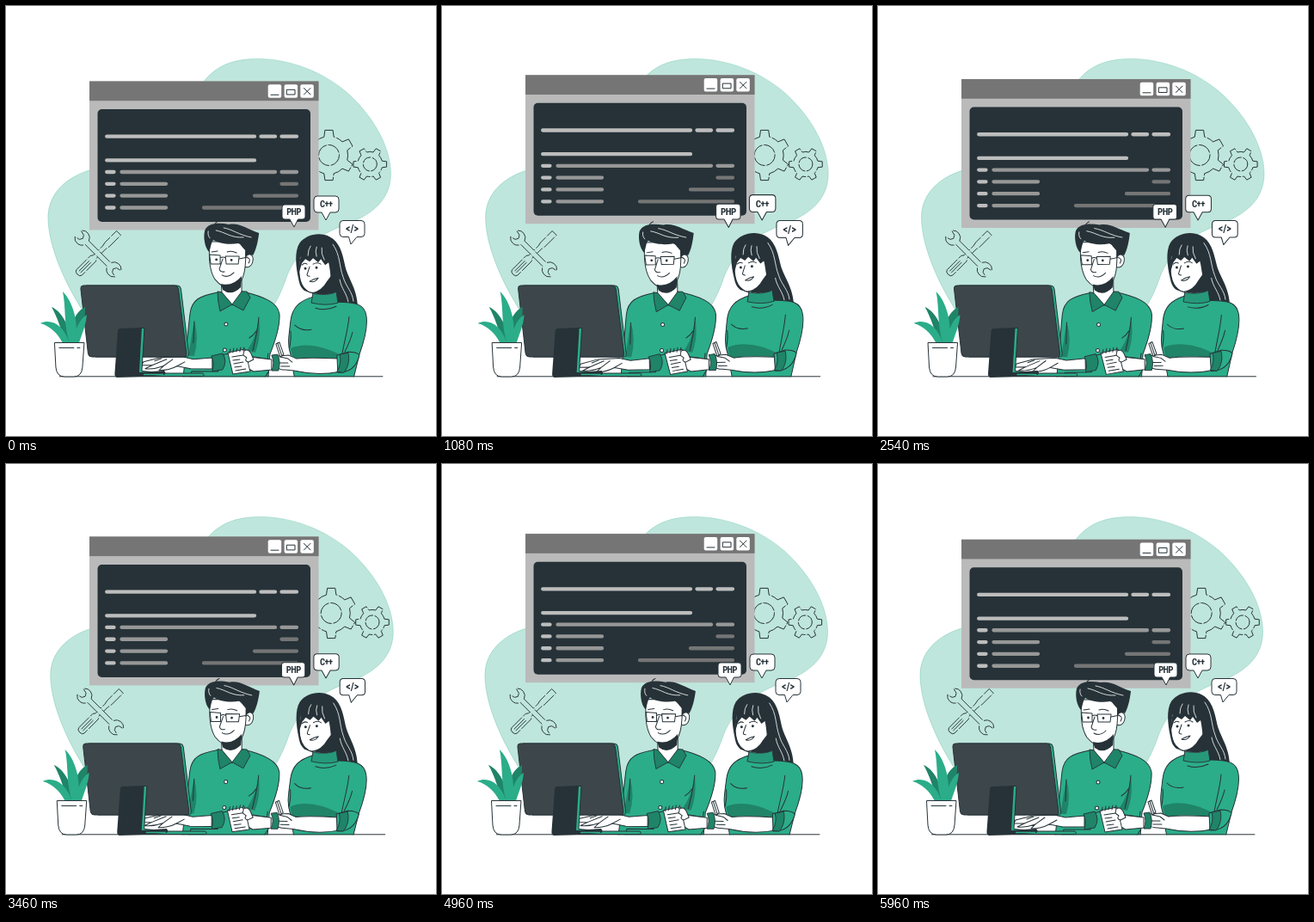
Recreate the animation shown at these times as an HTML page. Size 500x500 px, loop 6 s.

```html
<!DOCTYPE html>
<html lang="en">
<head>
<meta charset="utf-8">
<title>Coding together</title>
<style>
html, body { margin: 0; width: 100%; height: 100%; overflow: hidden; background: #fff; }
svg { display: block; width: 100vw; height: 100vh; }
.ink { fill: none; stroke: #263238; stroke-width: 1; stroke-linecap: round; stroke-linejoin: round; }
.skin { fill: #fff; stroke: #263238; stroke-width: 1; stroke-linejoin: round; }
.cloth { fill: #2bad89; stroke: #263238; stroke-width: 1; stroke-linejoin: round; }
.shade { fill: #1f8468; stroke: #263238; stroke-width: .9; stroke-linejoin: round; }
.dark { fill: #263238; }
.tint { fill: #bfe6dc; stroke: #263238; stroke-width: .9; stroke-linejoin: round; stroke-dasharray: 17 2; }
.light { stroke: #fff; stroke-width: .8; fill: none; stroke-linecap: round; }
.code { fill: none; stroke-width: 4.3; stroke-linecap: round; }
text { font-family: "Roboto Condensed", Roboto, "Liberation Sans", sans-serif; font-stretch: condensed; font-weight: 700; fill: #263238; text-anchor: middle; }
</style>
</head>
<body>
<svg viewBox="0 0 500 500">
  <clipPath id="above"><rect width="500" height="431.300"/></clipPath>

  <g id="blob">
    <path fill="#bfe6dc" stroke="#2bad89" stroke-opacity=".45" stroke-width=".6" d="M91 357C70 325 50 282 49 248C48 220 68 200 97 191C150 172 190 155 215 110C230 85 243 67 276 62.500C316 57 364 72 397 101C429 130 447 165 447.500 194C448 225 426 243 393 255C355 269 334 292 325 319C313 352 290 395 230 398H130C112 390 100 372 91 357Z"/>
  </g>

  <g id="icons">
    <path id="gearA" class="ink"/>
    <circle class="ink" cx="375.500" cy="173.500" r="12" stroke-dasharray="16 2.500"/>
    <path id="gearB" class="ink"/>
    <circle class="ink" cx="423.300" cy="184" r="8" stroke-dasharray="11 2.500"/>
    <g transform="translate(107 288)">
      <path class="tint" transform="rotate(-45)" d="M-31-4.500H-8L-5-2.500H10L15-3.500H34V3.500H15L10 2.500H-5L-8 4.500H-31Q-34 4-34 0T-31-4.500ZM-30-1.300H-12M-30 1.300H-12"/>
      <path class="tint" transform="rotate(45)" d="M-18-3A8.500 8.500 0 0 0-33-5L-27-3.500L-25 0L-27 3.500L-33 5A8.500 8.500 0 0 0-18 3H18A8.500 8.500 0 0 0 33 5L27 3.500L25 0L27-3.500L33-5A8.500 8.500 0 0 0 18-3Z"/>
    </g>
  </g>

  <g id="win">
    <rect x="97" y="87.500" width="266.500" height="173" fill="#bababa"/>
    <rect x="97" y="87.500" width="266.500" height="22.700" fill="#757575"/>
    <rect x="106.500" y="120" width="247.500" height="131" rx="5" class="dark"/>
    <g fill="#fff">
      <rect x="304.700" y="91.300" width="15.500" height="15.500" rx="2"/>
      <rect x="323.600" y="91.300" width="15.500" height="15.500" rx="2"/>
      <rect x="342.300" y="91.300" width="15.500" height="15.500" rx="2"/>
    </g>
    <path class="ink" d="M308 103.300H317M326.700 97.300H336V103H326.700ZM346.500 95.500L354 103M354 95.500L346.500 103"/>
    <path class="code" stroke="#bdbdbd" d="M117.200 151.700H289M296.500 151.700H313M320.500 151.700H338M117.200 179.400H289M117.200 193H125.500M117.200 206.800H125.500M117.200 220.600H125.500M117.200 234.500H125.500"/>
    <path class="code" stroke="#979797" d="M134.500 193H313M320.500 193H338M134.500 206.800H186M134.500 220.600H186M134.500 234.500H186"/>
    <path class="code" stroke="#757575" d="M320.500 206.800H338M289 220.600H338M230 234.500H338"/>
  </g>

  <g clip-path="url(#above)">
  <g id="people">
    <!-- woman -->
    <path class="dark" d="M340 317C337 303 335 286 341 276C348 266 364 262 376 268C388 274 391 287 394 301C397 316 408 327 409 349C397 351 380 348 372 340L347 331C342 327 341 322 340 317Z"/>
    <path class="light" d="M380 277C389 290 387 302 392 315C395 326 403 332 404 343M388 318C390 329 396 333 398 344"/>
    <path class="cloth" d="M357 338C341 343 333 350 331 366C329 384 327 393 331 405L336 434H404L411 405C416 391 421 372 419 360C417 347 408 344 385 344Z"/>
    <path fill="#1f8468" d="M331 398C345 391 368 394 390 406L386 412H334Z"/>
    <path class="ink" d="M331 378C332 385 331 391 330 397M399 361C398 374 394 388 391 404M403 379C401 388 397 396 394 402M336 371C342 377 350 377 355 376M360 351Q372 355 384 349"/>
    <path class="skin" d="M342 291C339 309 341 324 349 330Q353 334 357 333V339Q367 343 378 337V291Z"/>
    <path class="dark" d="M356 333Q367 331 373 320L379 312V334Q366 337 356 333Z"/>
    <path class="dark" d="M340 312C341 300 342 288 347 279L366 274L382 296L380 322C377 316 377 306 375 298L371 301L366 294L363 298L357 293L353 297L348 294L344 299Z"/>
    <path class="light" d="M351 290Q351 283 354 279M361 291Q359 285 361 280M370 295Q366 288 367 281"/>
    <path class="shade" d="M357 334C365 336 377 336 384 332L386 345Q372 349 355 345Z" style="fill:#26997a"/>
    <path class="ink" d="M344 301Q347 298 350 300M357 300Q362 297 366 300M353 303L350 312Q350 314 353 314M353 320Q359 322 363 316Q358 317 353 320"/>
    <circle class="dark" cx="348" cy="305" r="1.500"/><circle class="dark" cx="361" cy="304" r="1.500"/>
    <path class="skin" d="M390 410C370 409 352 408 338 410L329 406L317 407C312 409 316 413 318 415L314 419Q318 423 325 423L335 424Q362 430 388 425Z"/>
    <path class="cloth" d="M385 406L398 402Q409 402 411 406C408 418 401 426 386 426Z"/>
    <path class="shade" d="M388 405L398 403C400 412 398 420 393 426L385 425Q391 415 388 405Z"/>
    <path class="skin" d="M314 393L318 391L323 405L319 408Z"/>
    <path class="ink" d="M316 392L321 407M319 408L328 410L333 414M318 415L328 415M320 419L330 419"/>

    <!-- man -->
    <path class="cloth" d="M246 333C226 337 216 341 214 358L206 434H305L307 405C313 390 319 373 318 358C316 345 301 338 275 332Z"/>
    <path fill="#1f8468" d="M219 366Q225 386 219 407H212ZM294 362C296 378 295 390 290 403L280 401C288 390 292 378 294 362Z"/>
    <path class="ink" d="M294 362C293 377 290 388 287 401M305 404L302 427M219 367L218 392M291 378Q288 383 283 386"/>
    <path class="skin" d="M250 315L251 334L263 348L274 334V315Z"/>
    <path class="skin" d="M277 292C282 286 288 289 287 296C286 303 281 305 277 303Z"/>
    <path class="skin" d="M237 274C235 294 237 309 243 318Q253 330 264 328Q276 323 278 303L280 274Z"/>
    <path class="dark" d="M250 323Q263 327 274 314L273 327Q262 338 252 330Z"/>
    <path class="dark" d="M236 286C231 281 229 269 231 261C235 252 247 252 259 254C272 252 279 259 294 264C293 273 291 283 287 290Q281 287 278 294L278 284C274 280 273 277 270 276C259 278 247 276 241 272C238 275 238 282 236 286Z"/>
    <path class="light" d="M244 261C255 263 261 270 276 269M253 258C264 260 270 266 285 269M235 262Q234 267 237 270"/>
    <path class="ink" d="M241 259Q242 252 247 250M236.500 289L249 290V300L238 300ZM255 291H271L270 300H256ZM249 293Q252 291 255 293M271 294L281 292M239 286L246 285M257 286Q262 284 268 287M252 294L248 306Q249 310 254 309M251 313Q258 317 265 310M281 293Q285 294 282 299"/>
    <circle class="dark" cx="244.500" cy="295" r="1.400"/><circle class="dark" cx="262" cy="295.500" r="1.400"/>
    <path class="shade" d="M246 332L251 333L263 347L249 355Q246 343 246 332ZM263 347L274 332L280 332L284 339L276 354Z"/>
    <circle class="skin" cx="256" cy="370" r="2"/><circle class="skin" cx="254.500" cy="400" r="2"/>
    <path class="skin" d="M240 409L218 411L205 408L180 409L160 414L158 418H170L162 422Q172 423 183 419L178 424Q190 424 199 419L215 422L240 422Z"/>
    <path class="ink" d="M170 418L187 411M183 419L194 411M199 419L208 414M181 410L173 413"/>
    <path class="cloth" d="M245 407L260 404L302 410L306 424L300 434H214L216 425H247Z"/>
    <path class="shade" d="M239 407L252 404Q258 413 252 423L240 425Q243 416 239 407Z"/>
    <path class="skin" d="M283 408L309 411V423L288 425L279 420Z"/>
    <path class="shade" d="M309 406L316 405Q320 414 317 424H309Q313 415 309 406Z"/>
    <path class="skin" d="M258 403L278 399L284 425L264 428Z"/>
    <path class="ink" stroke-width="1.300" d="M260 404L261 399M264 403L265 398M268 402L269 398M272 402L273 397M276 401L277 397"/>
    <path class="ink" stroke-width=".8" d="M263 408L276 406M264 412L272 411M265 416L276 414M266 420L274 419M267 424L279 422"/>
    <path class="skin" d="M277 401Q282 398 285 404L288 411L282 414Q277 413 280 409L276 406Z"/>
    <path fill="#fff" d="M307 425H333L335 434H306Z"/>
  </g>
  </g>

  <g id="chat">
    <g class="skin" stroke-width="1.100">
      <path d="M324 231H345Q348 231 348 234V245Q348 248 345 248H339.500L335 257L330 248H324Q321 248 321 245V234Q321 231 324 231Z"/>
      <path d="M362 221H383Q387 221 387 225V236Q387 240 383 240H377L372 249L367 240H362Q358 240 358 236V225Q358 221 362 221Z"/>
      <path d="M392 249.500H413Q417 249.500 417 253.500V264.500Q417 268.500 413 268.500H408L401 277L398.500 268.500H392Q388 268.500 388 264.500V253.500Q388 249.500 392 249.500Z"/>
    </g>
    <text x="334.600" y="243.300" font-size="10.500" letter-spacing="-.5">PHP</text>
    <text x="372.300" y="234.300" font-size="10.500" letter-spacing="-.5">C++</text>
    <text x="402.500" y="263" font-size="12">&lt;/&gt;</text>
  </g>

  <g id="desk">
    <path class="ink" d="M62.500 430.800H438"/>
    <path class="cloth" d="M93 325H199Q203 325 203.500 329L212.500 404Q213 408 209 408H104Z"/>
    <path d="M90 325H196Q200 325 200.500 329L210 404Q210.500 408 206.500 408H100Q96 408 95.500 404L87 329Q86.500 325 90 325Z" fill="#3c464b" stroke="#263238"/>
    <path class="cloth" stroke-width=".6" d="M157 374.500H161L158 424.500L186 427H229Q232 430 228 430.500H150Z"/>
    <path class="dark" d="M133 375L158 374L155 426L184 424Q187 427 184 429L156 431L129 432Q126 431 126.500 427L130 379Q130 375 133 375Z"/>
    <path d="M160 428.500H183" stroke="#2bad89" stroke-width="1.500"/>

    <path fill="#1f8468" d="M76 392C75 374 78 357 92 350C93 366 87 378 83 392ZM69 392C64 376 60 362 53 350C65 355 74 372 77 392Z"/>
    <path fill="#2bad89" d="M74 392C67 372 70 350 66 332C78 344 85 368 81 392ZM66 392C60 380 51 372 40 369C53 363 67 371 74 392ZM79 392C80 377 85 364 94 359C93 372 88 382 85 392Z"/>
    <path class="skin" d="M56.500 391.500H91L89 420Q88 431 79 431H68Q59 431 58 420Z"/>
    <path class="ink" d="M62 397.500H79M83 397.500H86"/>
  </g>
</svg>
<script>
const $ = id => document.getElementById(id);

function gear(cx, cy, root, tip, turn) {
  const at = (r, deg) => {
    const a = (deg + turn) * Math.PI / 180;
    return (cx + r * Math.cos(a)).toFixed(1) + ' ' + (cy + r * Math.sin(a)).toFixed(1);
  };
  let d = '';
  for (let k = 0; k < 6; k++) {
    const m = k * 60;
    d += (k ? 'L' : 'M') + at(root, m - 15) + 'L' + at(tip, m - 9) + 'L' + at(tip, m + 9) +
      'L' + at(root, m + 15) + `A${root} ${root} 0 0 1 ` + at(root, m + 45);
  }
  return d + 'Z';
}
$('gearA').setAttribute('d', gear(375.5, 173.5, 22, 29.5, -90));
$('gearB').setAttribute('d', gear(423.3, 184, 14.5, 19.5, 0));
$('gearA').setAttribute('stroke-dasharray', '26 2.5');
$('gearB').setAttribute('stroke-dasharray', '20 2.5');

// steps: [position in the cycle, value], joined by straight ramps
const float = [[0, 0], [.5, -10], [1, 0]];
const shake = [[0, 0], [.1, -1], [.2, 2], [.3, -4], [.4, 4], [.5, -4], [.6, 4], [.7, -4], [.8, 2], [.9, -1], [1, 0]];
const tilt = [[0, 0], [.25, 1], [.75, -1], [1, 0]];
const sway = [[0, 0], [.065, -1.7], [.27, -1.5], [.48, -1], [.54, -.4], [.73, 2.7], [.98, .7], [1, 0]];
const pulse = [[0, 1], [.18, 1.05], [.42, 1.025], [.58, 1.01], [.69, 1], [1, 1]];

function ramp(steps, time, period) {
  const p = time % period / period;
  const i = steps.findIndex(s => s[0] > p);
  const [a, from] = steps[i - 1], [b, to] = steps[i];
  return from + (to - from) * (p - a) / (b - a);
}

const move = (id, value) => $(id).setAttribute('transform', value);
const start = performance.now();

function draw(now) {
  const t = Math.max(0, now - start) % 6000;
  const s = t + 45;
  const x = ramp(shake, s, 6000).toFixed(3);
  move('blob', `translate(${x} 0)`);
  move('desk', `translate(${x} 0)`);
  move('icons', `translate(${ramp(sway, t, 2000).toFixed(3)} 0)`);
  move('win', `translate(0 ${(ramp(float, s, 3000) + .3).toFixed(3)})`);
  move('people', `rotate(${ramp(tilt, s, 1500).toFixed(4)} 289 341)`);
  move('chat', `translate(369 249) scale(${ramp(pulse, t, 6000).toFixed(4)}) translate(-369 -249)`);
  requestAnimationFrame(draw);
}
draw(start);
</script>
</body>
</html>
```
